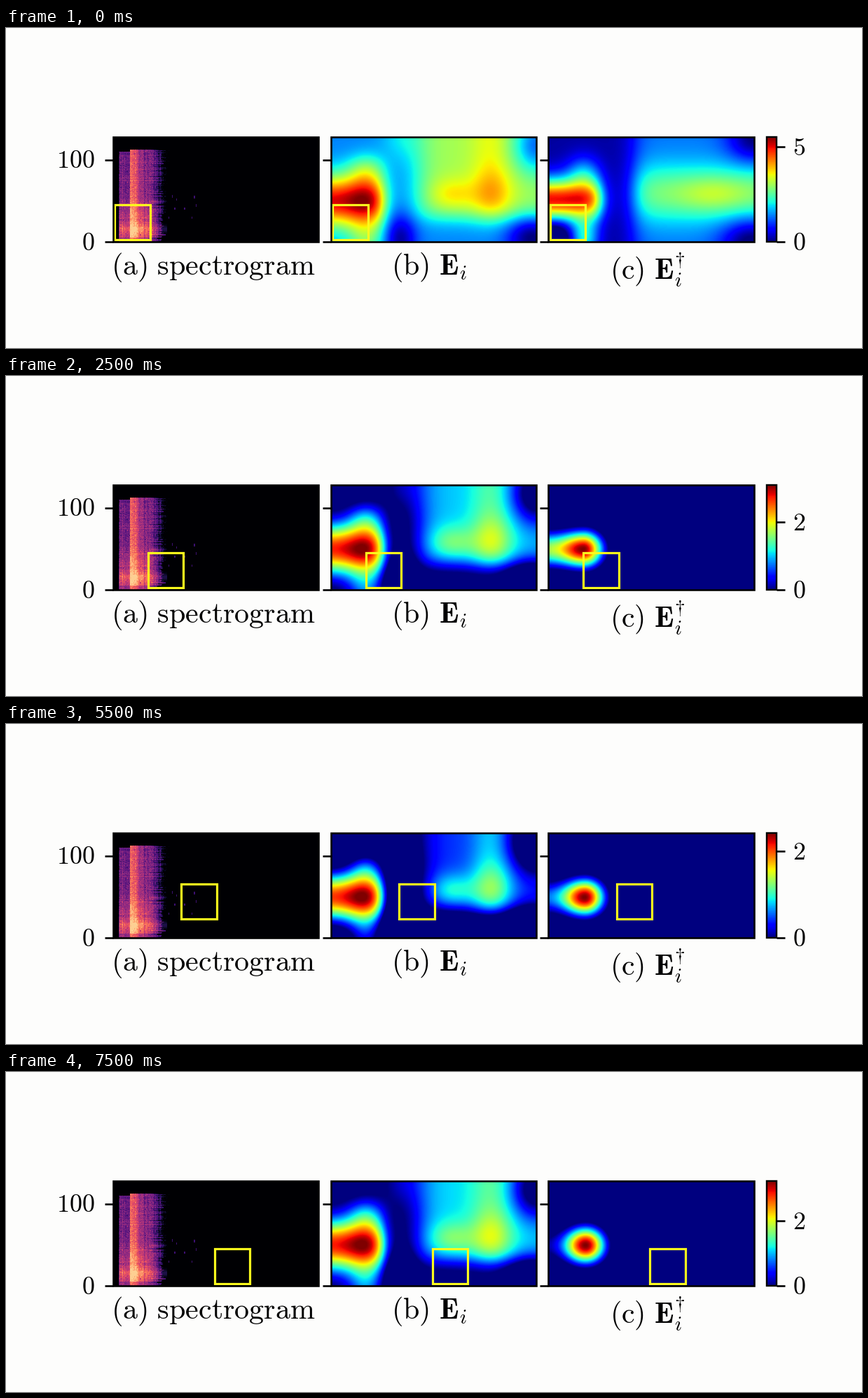
Recreate the animation shown at these times as a matplotlib script. Size 1222x458 px, loop 8000 ms.

```python
import matplotlib.pyplot as plt
import numpy as np
from matplotlib.animation import FuncAnimation
from matplotlib.patches import Rectangle

W, H, DPI = 1222, 458, 64
PT = 72 / DPI  # points per pixel
TOP, BOTTOM = 156.3, 306.0
PANELS = (152.7, 463.7, 774.2)
PANEL_W = 293.6
BAR = (1086, 1100)
ROWS_PER_COL = 5
SILENT = (4, 7, 12)  # steps with an empty third panel

plt.rcParams["mathtext.fontset"] = "cm"
fig = plt.figure(figsize=(W / DPI, H / DPI), dpi=DPI, facecolor="#fdfdfc")
ax = fig.add_axes([0, 0, 1, 1])
ax.axis("off")


def text(x, y, s, size, ha="left"):
    return ax.text(x, y, f"${s}$", fontsize=size * PT, ha=ha, va="baseline")


def line(x0, x1, y):
    return ax.plot([x0, x1], [y, y], color="black", lw=2.6 * PT,
                   solid_capstyle="butt", zorder=3)[0]


def image(data, x0, x1, cmap):
    return ax.imshow(data, extent=(x0, x1, BOTTOM, TOP), cmap=cmap, vmin=0,
                     vmax=1, aspect="auto", interpolation="nearest")


def outline(x, y, w, h, color, lw, z):
    return ax.add_patch(Rectangle((x, y), w, h, fill=False, ec=color,
                                  lw=lw * PT, joinstyle="miter", zorder=z))


# Panel coordinates: x from the panel's left edge, y in stage pixels
X = np.linspace(0, 293, 294)[None, :]
Y = np.linspace(157, 306, 150)[:, None]


def bell(v, centre, width):
    return np.exp(-((v - centre) / width) ** 2 / 2)


def bump(x, y, sx, sy):
    return bell(X, x, sx) * bell(Y, y, sy)


def rise(v, centre, width):
    return 1 / (1 + np.exp((centre - v) / width))


def energy_field():
    streak = bell(Y, 248, 26) * rise(-X, -73, 7)
    lobe = (0.11 * bell(X, 48, 20) * rise(Y, 190, 8)
            + 0.1 * bump(50, 203, 18, 17) + 0.1 * bump(50, 306, 18, 20))
    plateau = rise(X, 124, 12) * rise(-Y, -272, 9) * (0.3 + 0.08 * bell(X, 228, 20))
    peaks = 0.115 * bump(230, 238, 22, 26) + 0.12 * bump(172, 239, 24, 17)
    dips = (0.32 * bump(293, 168, 24, 29) + 0.27 * bump(286, 300, 24, 22)
            + 0.23 * bump(98, 302, 16, 25) - 0.08 * bump(98, 157, 20, 25))
    return 0.25 + 0.66 * streak + lobe + plateau + peaks - dips


def dagger_field():
    streak = bell(Y, 246, 21) * rise(-X, -73, 7)
    lobe = 0.2 * bump(50, 207, 17, 18) + 0.36 * bump(50, 302, 15, 20)
    plateau = rise(X, 122, 9) * (0.21 + 0.25 * bell(Y, 237, 30))
    peak = 0.1 * bump(235, 238, 36, 18)
    dips = (0.25 * bump(293, 160, 26, 24) + 0.28 * bump(290, 306, 30, 24)
            + 0.28 * bump(6, 300, 22, 18))
    return 0.03 + 0.87 * streak + lobe + plateau + peak - dips


ENERGY = energy_field()
DAGGER = dagger_field()


def peak_at(n):
    return np.interp(n, [0, 2, 4, 5, 7, 9, 12, 15],
                     [5.52, 3.87, 5.2, 3.1, 1.6, 2.04, 2.59, 3.22])


def energy(peak):
    drop = 5.5 * (1 - ENERGY) * (0.92 + 0.092 * peak) / 1.43
    return np.clip(1 - drop / peak, 0, 1)


def dagger(n):
    if n == 0:
        return np.clip(DAGGER, 0, 1)
    if n in SILENT:
        return np.zeros_like(DAGGER)
    # a round blob whose left tail fades step by step
    tail = max(0, 0.8 - 0.053 * n)
    centre = 53 - 6 * tail
    floor = (tail + 0.25) / 1.25 if tail > 0 else 0
    gx = bell(X, centre, 20)
    gx = np.where(X < centre, floor + (1 - floor) * gx, gx)
    return np.clip(1.25 * gx * bell(Y, 248.5, 18.5) - 0.25, 0, 1)


def spectrogram():
    rng = np.random.default_rng(4)
    f = np.arange(127, -1, -1)[:, None]
    c = np.arange(252)[None, :]
    edge = c + (c > 42) * (rng.normal(0, 2.5, (128, 1)) - 0.04 * (f - 50))
    s = np.interp(edge, [6, 8, 14, 20, 21, 27, 32, 46, 54, 62],
                  [0, .48, .36, .42, .74, .7, .52, .4, .24, 0])
    lit = s > 0.04
    s += lit * (0.16 * bell(f, 8, 22) - 0.0008 * f)
    s += lit * (rng.normal(0, .03, (1, 252)) + rng.normal(0, .02, (128, 1))
                + rng.normal(0, .045, (128, 252)))
    s += 0.13 * bell(f, 15, 3) * ((c > 7) & (c < 66))
    s *= np.where(f < 5, 0.75, 1) * (f < np.where(c < 21, 110, 113))
    for col, row in zip(rng.integers(68, 105, 8), rng.integers(18, 60, 8)):
        s[127 - row:130 - row, col] = 0.2
    return np.clip(s, 0, 0.9)


image(spectrogram(), PANELS[0], PANELS[0] + PANEL_W, "magma")
view_b, view_c = (image(ENERGY, x, x + PANEL_W, "jet") for x in PANELS[1:])
image(np.linspace(1, 0, 256)[:, None], *BAR, "jet")

for x in PANELS:
    outline(x, TOP, PANEL_W, BOTTOM - TOP, "black", 2.6, 3)
    for y in (188.5, BOTTOM):
        line(x - 12, x, y)
outline(BAR[0], TOP, BAR[1] - BAR[0], BOTTOM - TOP, "black", 2.4, 3)
line(BAR[1], 1112, BOTTOM)
boxes = [outline(x, BOTTOM, 50.6, 50.4, "#fbfb1c", 3.2, 2) for x in PANELS]

text(127, 200.5, "100", 36, "right")
text(127, 318, "0", 36, "right")
text(149.5, 353, r"\mathrm{(a)\ spectrogram}", 42)
text(550.5, 353, r"\mathrm{(b)}\ \mathbf{E}_i", 42)
text(862.5, 360, r"\mathrm{(c)}\ \mathbf{E}_i^{\dagger}", 42)

zero = text(1123, 318, "0", 36)
tick = line(BAR[1], 1112, TOP)
tick_label = text(1123, TOP, "5", 36)

ax.set_xlim(0, W)
ax.set_ylim(H, 0)


def update(n):
    peak = peak_at(n)
    view_b.set_data(energy(peak))
    view_c.set_data(dagger(n))

    col, row = divmod(n, ROWS_PER_COL)
    for box, x in zip(boxes, PANELS):
        box.set_xy((x + 2.6 + 47.5 * col, 253 - 24 * row))

    step = next(s for s in (1, 2, 2.5, 5) if s >= peak / 2)
    digits = 1 if step == 2.5 else 0
    y = BOTTOM - (BOTTOM - TOP) * step / peak
    tick.set_ydata([y, y])
    tick_label.set_y(y + 12)
    tick_label.set_text(f"${step:.{digits}f}$")
    zero.set_text(f"${0:.{digits}f}$")
    return [view_b, view_c, tick, tick_label, zero, *boxes]


anim = FuncAnimation(fig, update, frames=16, interval=500, repeat=True,
                     repeat_delay=0)
plt.show()
```
